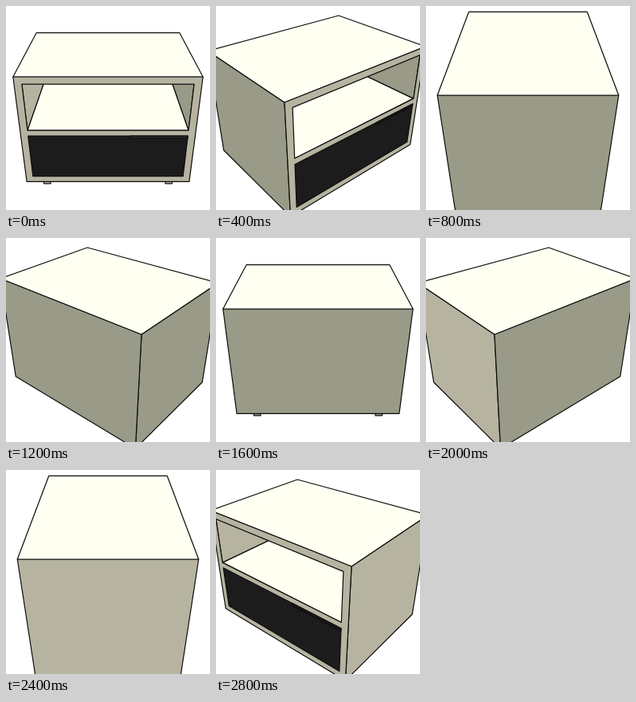
These frames come from a looping animation (256x256 px, 3.2 s). An HTML page with a canvas:

```html
<!DOCTYPE html>
<html lang="en">
<head>
<meta charset="utf-8">
<title>Nightstand turntable</title>
<style>
html, body { margin: 0; width: 100%; height: 100%; overflow: hidden; background: #fff; }
canvas { display: block; width: 100vw; height: 100vh; }
</style>
</head>
<body>
<canvas id="stage" width="256" height="256"></canvas>
<script>
const ctx = document.getElementById('stage').getContext('2d');
const STEP = 400, FOCAL = 478, MID = 128;

// Cabinet size: width is 1, heights are measured down from the top.
const HW = 0.5, HD = 0.3735, H = 0.705, T = 0.042;
const IN = HW - T, SHELF = 0.332, DRAWER = 0.37;

const IVORY = '#fffff2', LIGHT = '#b6b4a1', DARK = '#999a87', BLACK = '#1c1c1c', LINE = '#0c0c0a';

// pitch in degrees, dist = depth of the top's centre, lift = top above the aim point
const STRAIGHT = { pitch: 28.9, dist: 2.332, lift: 0.3931 };
const CORNER = { pitch: 31.3, dist: 2.18, lift: 0.3973 };
const SIDE = { pitch: 33.6, dist: 1.986, lift: 0.3952 };
const TURN = 39.7;
const VIEWS = [
  [0, STRAIGHT], [TURN, CORNER], [90, SIDE], [180 - TURN, CORNER],
  [180, STRAIGHT], [180 + TURN, CORNER], [270, SIDE], [360 - TURN, CORNER]
];

const rad = deg => deg * Math.PI / 180;

function projector(yaw, { pitch, dist, lift }) {
  const cy = Math.cos(rad(yaw)), sy = Math.sin(rad(yaw));
  const cp = Math.cos(rad(pitch)), sp = Math.sin(rad(pitch));
  return ([x, v, z]) => {
    const near = z * cy - x * sy;
    const k = FOCAL / (dist + v * sp - near * cp);
    return [MID + k * (x * cy + z * sy), MID + k * (near * sp - (lift - v) * cp)];
  };
}

// Quads run clockwise when seen from their visible side.
const frontQuad = (x0, x1, v0, v1, z = HD) => [[x0, v0, z], [x1, v0, z], [x1, v1, z], [x0, v1, z]];
const sideQuad = (x, z0, z1, v0, v1) => [[x, v0, z0], [x, v0, z1], [x, v1, z1], [x, v1, z0]];
const flatQuad = (w, d, v) => [[-w, v, -d], [w, v, -d], [w, v, d], [-w, v, d]];

function facing(pts) {
  let area = 0;
  pts.forEach(([x, y], i) => {
    const [nx, ny] = pts[(i + 1) % pts.length];
    area += x * ny - nx * y;
  });
  return area > 1;
}

function trace(pts) {
  ctx.beginPath();
  pts.forEach(p => ctx.lineTo(...p));
  ctx.closePath();
}

function drawView(yaw, cam) {
  const project = projector(yaw, cam);
  const face = (quad, color, width = 1.2) => {
    const pts = quad.map(project);
    if (!facing(pts)) return false;
    trace(pts);
    ctx.fillStyle = color;
    ctx.fill();
    ctx.lineWidth = width;
    ctx.strokeStyle = LINE;
    ctx.stroke();
    return true;
  };

  ctx.fillStyle = '#fff';
  ctx.fillRect(0, 0, 256, 256);
  ctx.lineJoin = 'round';

  if (cam === STRAIGHT) {
    const z = yaw ? -HD : HD, dir = yaw ? -1 : 1;
    for (const x of [-0.375, 0.375])
      face(frontQuad(x - 0.021 * dir, x + 0.021 * dir, H, H + 0.015, z), yaw ? DARK : LIGHT);
  }

  face(sideQuad(-HW, -HD, HD, 0, H), DARK);
  face(sideQuad(HW, HD, -HD, 0, H), LIGHT);
  face(frontQuad(HW, -HW, 0, H, -HD), DARK);
  face(flatQuad(HW, HD, 0), IVORY);
  if (!face(frontQuad(-HW, HW, 0, H), LIGHT)) return;

  // open compartment
  const opening = frontQuad(-IN, IN, T, SHELF).map(project);
  ctx.save();
  trace(opening);
  ctx.clip();
  face(flatQuad(IN, HD, SHELF), IVORY);
  face(sideQuad(-IN, HD, -HD, T, SHELF), LIGHT);
  face(sideQuad(IN, -HD, HD, T, SHELF), DARK);
  ctx.restore();
  trace(opening);
  ctx.lineWidth = 1.2;
  ctx.stroke();

  // drawer with its pull
  face(frontQuad(-IN, IN, DRAWER, H - T), BLACK);
  face(frontQuad(0.128, IN, DRAWER, DRAWER + 0.016), cam === STRAIGHT ? '#2b2b29' : BLACK);
}

let shown = -1;
function tick(now) {
  const i = Math.floor(now / STEP) % VIEWS.length;
  if (i !== shown) {
    shown = i;
    drawView(...VIEWS[i]);
  }
  requestAnimationFrame(tick);
}
const start = performance.now();
const loop = () => { tickAt(); requestAnimationFrame(loop); };
function tickAt() {
  const i = Math.floor((performance.now() - start) / STEP) % VIEWS.length;
  if (i !== shown) drawView(...VIEWS[shown = i]);
}
loop();
</script>
</body>
</html>
```
